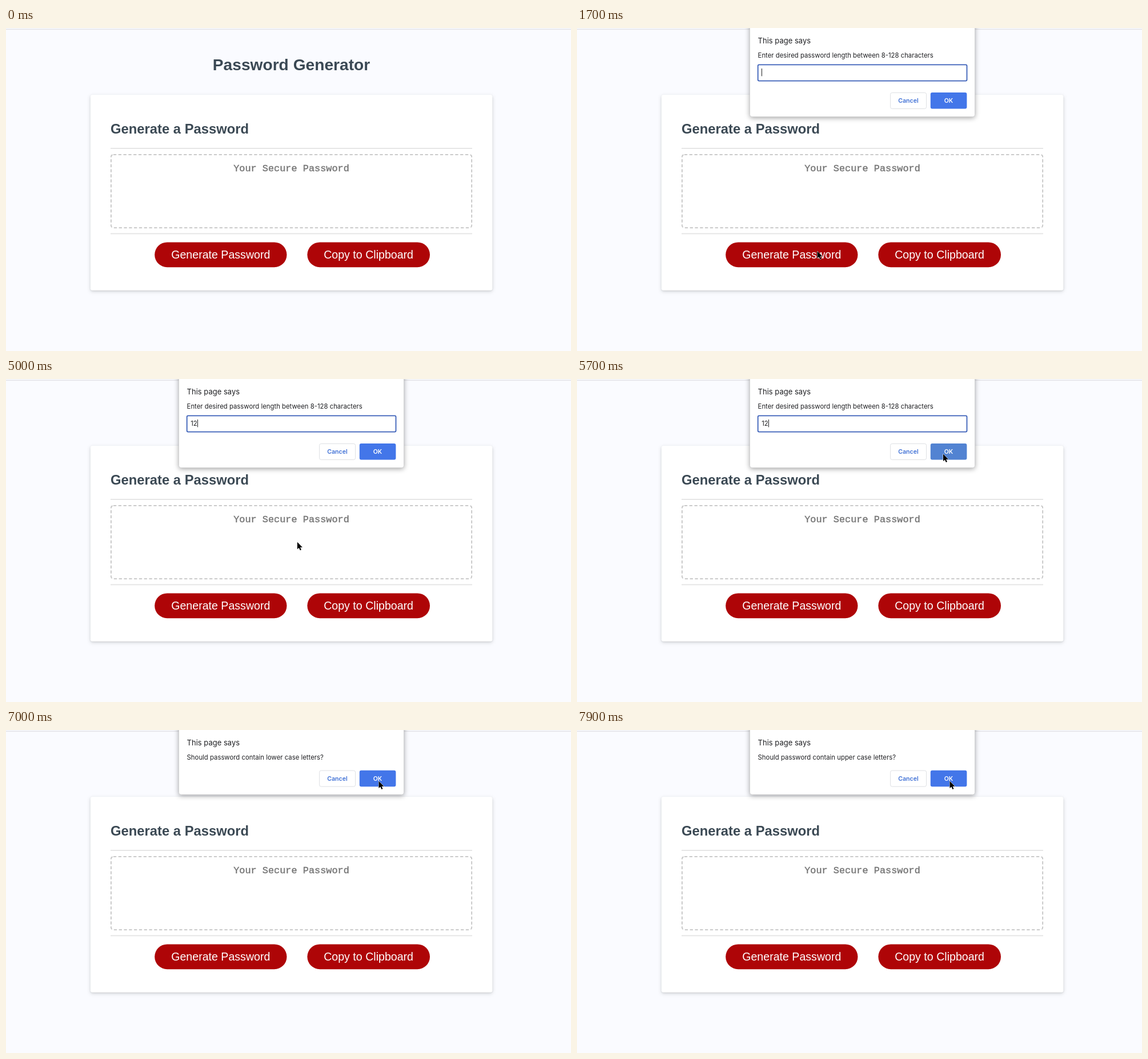
Animation, 989 px wide and 566 px high, one loop 8000 ms. Source, as an HTML page:

```html
<!DOCTYPE html>
<html lang="en">
<head>
<meta charset="utf-8">
<title>Password Generator</title>
<style>
  html, body { margin: 0; width: 100%; height: 100%; overflow: hidden; background: #fafbff; }
  svg { display: block; width: 989px; height: 566px; }
  text { white-space: pre; }
  .page { font-family: "Liberation Sans", Arial, sans-serif; fill: #3b4954; }
  .head { font-weight: 700; }
  .mid { text-anchor: middle; }
  .card { fill: #fff; filter: drop-shadow(0 1px 1px rgba(60,64,67,.1)) drop-shadow(0 2px 3px rgba(60,64,67,.2)); }
  .rule { fill: #e4e4e4; }
  .pill { fill: #ae0507; }
  .label { font-size: 19.6px; fill: #fff; }
  .hint { font: 16.9px "Liberation Mono", "Courier New", monospace; fill: #757575; stroke: #757575; stroke-width: .4; }
  .box { fill: none; stroke: #c4c4c4; stroke-width: 1.76; stroke-dasharray: 5.3 3.5; }
  #dialog { font-family: Inter, sans-serif; font-size: 11.35px; fill: #202124; }
  #panel { fill: #fff; stroke: #c3c3c5; stroke-width: .6; filter: drop-shadow(0 2px 4px rgba(0,0,0,.35)); }
  .action { font-size: 10.56px; font-weight: 600; }
</style>
</head>
<body>
<svg viewBox="0 0 989 566">
  <rect width="989" height="566" fill="#fafbff"/>
  <rect y="1.6" width="989" height="1.2" fill="#dcdde1"/>

  <g class="page">
    <text class="head mid" x="499.5" y="74" font-size="28.16">Password Generator</text>
    <rect class="card" x="147.8" y="117" width="703.6" height="342.8" rx="3.5"/>
    <text class="head" x="183" y="185" font-size="23.8">Generate a Password</text>
    <rect class="rule" x="183" y="210" width="633" height="1.8"/>
    <rect class="box" x="183.9" y="221.9" width="631.3" height="128.2" rx="4"/>
    <text class="hint mid" x="499.5" y="251">Your Secure Password</text>
    <rect class="rule" x="183" y="359.5" width="633" height="1.8"/>
    <rect class="pill" x="260.2" y="375.4" width="231.3" height="43.8" rx="21.9"/>
    <text class="label mid" x="375.8" y="403.7">Generate Password</text>
    <rect class="pill" x="527.4" y="375.4" width="214.6" height="43.8" rx="21.9"/>
    <text class="label mid" x="634.6" y="403.7">Copy to Clipboard</text>
  </g>

  <g id="dialog">
    <rect id="panel" x="302.5" y="-10" width="394" rx="4"/>
    <text x="316.6" y="27" font-size="13">This page says</text>
    <text id="message" x="316.6" y="52.4"></text>
    <g id="field">
      <rect x="316.7" y="64.4" width="365.8" height="28.2" rx="2" fill="#fff" stroke="#3a5fb8" stroke-width="1.8"/>
      <text id="entry" x="323.2" y="82"></text>
      <rect id="caret" y="71" width="1" height="13.4"/>
    </g>
    <g id="actions" class="action mid">
      <rect x="548.6" y="113.4" width="63" height="28" rx="3" fill="#fff" stroke="#dadce0" stroke-width=".9"/>
      <text x="580" y="131.1" fill="#4071d6">Cancel</text>
      <rect id="ok" x="618.8" y="113" width="63.6" height="28.6" rx="3"/>
      <text x="650.5" y="131.1" fill="#fff">OK</text>
    </g>
  </g>

  <path id="pointer" d="M0 0V12.6L2.9 9.9L4.9 14.4L7 13.5L5 9.2H9Z" fill="#000" stroke="#fff" stroke-width="1" paint-order="stroke"/>
</svg>
<script>
const $ = id => document.getElementById(id);
const show = (el, on) => el.setAttribute('display', on ? 'inline' : 'none');

// Pointer stops: time, x, y
const stops = [
  [100, 446, 547], [900, 421, 465], [1200, 420.5, 391], [2200, 420.5, 391],
  [2400, 419, 390], [4600, 419, 390], [5500, 637, 140], [5700, 641, 131.5],
  [6600, 641, 131.5], [7000, 652.5, 89.5], [8000, 652.5, 89.5]
];
// Times at which the caret turns on or off
const blinks = [1700, 2000, 2300, 2700, 3000, 3400, 3700, 4400, 4700, 5100, 5400];

function pointerAt(t) {
  const i = stops.findIndex(s => s[0] > t);
  const [t0, x0, y0] = stops[i - 1], [t1, x1, y1] = stops[i];
  const u = (t - t0) / (t1 - t0), k = u * u * (3 - 2 * u);
  return [x0 + (x1 - x0) * k, y0 + (y1 - y0) * k];
}

function draw(time) {
  const t = Math.floor(time % 8000 / 100) * 100;

  show($('pointer'), t >= 100);
  if (t >= 100) $('pointer').setAttribute('transform', `translate(${pointerAt(t)})`);

  const prompt = t >= 1700 && t < 5900;
  show($('dialog'), prompt || t >= 6000 && t < 7700 || t >= 7800);
  show($('field'), prompt);
  $('panel').setAttribute('height', prompt ? 165.5 : 123.2);
  $('actions').setAttribute('transform', `translate(0 ${prompt ? 0 : -42.3})`);
  $('message').textContent = prompt
    ? 'Enter desired password length between 8-128 characters'
    : `Should password contain ${t < 7700 ? 'lower' : 'upper'} case letters?`;

  const typed = t < 4000 ? 0 : t < 4200 ? 1 : 2;
  $('entry').textContent = '12'.slice(0, typed);
  $('caret').setAttribute('x', 323 + typed * 6);
  show($('caret'), blinks.filter(b => b <= t).length % 2);

  const hover = t >= 5600 && t < 5900 || t >= 7500 && t < 7700;
  $('ok').setAttribute('fill', hover ? '#5283d2' : '#4376e9');
}

const start = performance.now();
(function loop() {
  draw(performance.now() - start);
  requestAnimationFrame(loop);
})();
</script>
</body>
</html>
```
